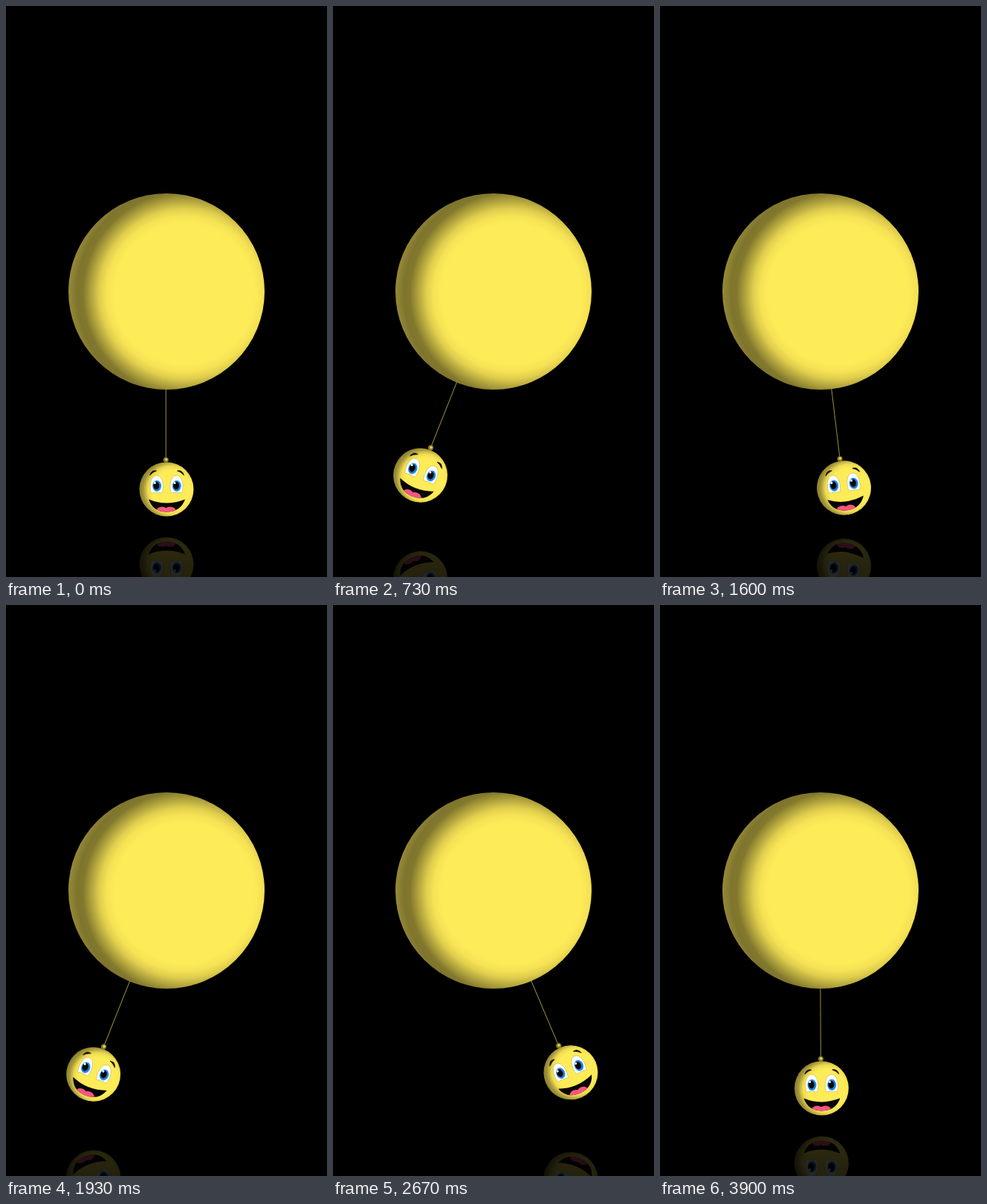
Recreate the animation shown at these times as an HTML page. Size 432 px wide and 768 px high, loop 3.96 s.

```html
<!DOCTYPE html>
<html lang="en">
<head>
<meta charset="utf-8">
<title>Swinging smiley</title>
<style>
  html, body { margin: 0; width: 100%; height: 100%; overflow: hidden; background: #000; }
  svg { display: block; width: 100%; height: 100%; }
</style>
</head>
<body>
<svg viewBox="0 0 432 768">
  <defs>
    <radialGradient id="sphere" gradientUnits="userSpaceOnUse" cx="240" cy="387" r="157">
      <stop offset=".6" stop-color="#fdec58"/>
      <stop offset=".67" stop-color="#f6e255"/>
      <stop offset=".73" stop-color="#dfcd4d"/>
      <stop offset=".8" stop-color="#b0a23d"/>
      <stop offset=".87" stop-color="#82782d"/>
      <stop offset=".92" stop-color="#7e742d"/>
      <stop offset="1" stop-color="#988c38"/>
    </radialGradient>
    <radialGradient id="skin" gradientUnits="userSpaceOnUse" cx="223" cy="651" r="44">
      <stop offset=".6" stop-color="#fdec58"/>
      <stop offset=".73" stop-color="#eedb50"/>
      <stop offset=".87" stop-color="#a5973a"/>
      <stop offset="1" stop-color="#82782d"/>
    </radialGradient>
    <radialGradient id="iris">
      <stop offset=".4" stop-color="#0a5fb8"/>
      <stop offset="1" stop-color="#2a9df0"/>
    </radialGradient>
    <linearGradient id="fade" gradientUnits="userSpaceOnUse" x1="0" y1="701" x2="0" y2="790">
      <stop offset="0" stop-color="#fff" stop-opacity=".2"/>
      <stop offset="1" stop-color="#fff" stop-opacity=".12"/>
    </linearGradient>
    <mask id="fadeMask" maskUnits="userSpaceOnUse" x="0" y="701" width="432" height="120"
          color-interpolation="sRGB">
      <rect y="701" width="432" height="120" fill="url(#fade)"/>
    </mask>
    <clipPath id="mouthClip"><path d="M192 663.5Q216 673.500 241 663.5Q235 680.500 216 680.5Q198 680.500 192 663.5Z"/></clipPath>
    <g id="eye">
      <path d="M-7.500 11.5Q-9.500 4 -8 -3Q-6 -12 0 -12Q6 -12 8 -3Q9.500 4 7.500 11.5Q0 10 -7.500 11.5Z"
            fill="#fff" stroke="#b5a54a" stroke-width=".5"/>
      <ellipse cx=".3" cy="2" rx="6" ry="7.6" fill="url(#iris)"/>
      <ellipse cx="-.5" cy="1.5" rx="3.9" ry="5.2" fill="#050505"/>
      <circle cx="-2.5" cy="-2" r="1.5" fill="#fff"/>
    </g>
    <g id="bob">
      <circle cx="216" cy="650" r="36.5" fill="url(#skin)"/>
      <circle cx="215.2" cy="610.5" r="3.6" fill="#82782d"/>
      <circle cx="215.6" cy="610" r="1.7" fill="#e8d850"/>
      <use href="#eye" x="202.8" y="643.5"/>
      <use href="#eye" x="229.5" y="643.5"/>
      <path d="M193.500 631Q196 623.500 202.500 625.200Q197.500 626.500 193.500 631Z
               M239.500 631Q237 623.500 230.500 625.200Q235.500 626.500 239.500 631Z"
            fill="#17130a" stroke="#17130a" stroke-width=".9" stroke-linejoin="round"/>
      <g clip-path="url(#mouthClip)">
        <rect x="190" y="660" width="54" height="22" fill="#080404"/>
        <ellipse cx="210" cy="679" rx="7.5" ry="5.5" fill="#f5577f"/>
        <ellipse cx="221" cy="679" rx="7.5" ry="5.5" fill="#f5577f"/>
      </g>
    </g>
    <g id="pendulum">
      <path d="M215.2 384V609" stroke="#8c8236" stroke-width="1.1"/>
      <use href="#bob"/>
    </g>
  </defs>
  <rect width="432" height="768" fill="#000"/>
  <g mask="url(#fadeMask)">
    <g transform="translate(0 1401) scale(1 -1)"><use class="swing" href="#pendulum"/></g>
  </g>
  <use class="swing" href="#pendulum"/>
  <circle cx="216" cy="384" r="132" fill="url(#sphere)"/>
</svg>
<script>
  const LOOP = 3960, STEP = 100 / 3, LAST_STEP = 117;
  const LEG = 20 * STEP;
  // Degrees to the right at the end of each leg; the last one is held.
  const TURNS = [0, -23, 23, -23, 23, 0.3];
  const swings = document.querySelectorAll('.swing');

  const ease = x => x * x * (3 - 2 * x);

  function angleAt(ms) {
    const leg = Math.min(Math.floor(ms / LEG), TURNS.length - 2);
    const progress = Math.min(1, ms / LEG - leg);
    return TURNS[leg] + (TURNS[leg + 1] - TURNS[leg]) * ease(progress);
  }

  function draw(ms) {
    const step = Math.min(LAST_STEP, Math.floor((ms % LOOP + 5) / STEP));
    const rotation = `rotate(${-angleAt(step * STEP)} 216 384)`;
    swings.forEach(el => el.setAttribute('transform', rotation));
  }

  const start = performance.now();
  function tick() {
    draw(performance.now() - start);
    requestAnimationFrame(tick);
  }
  tick();
</script>
</body>
</html>
```
